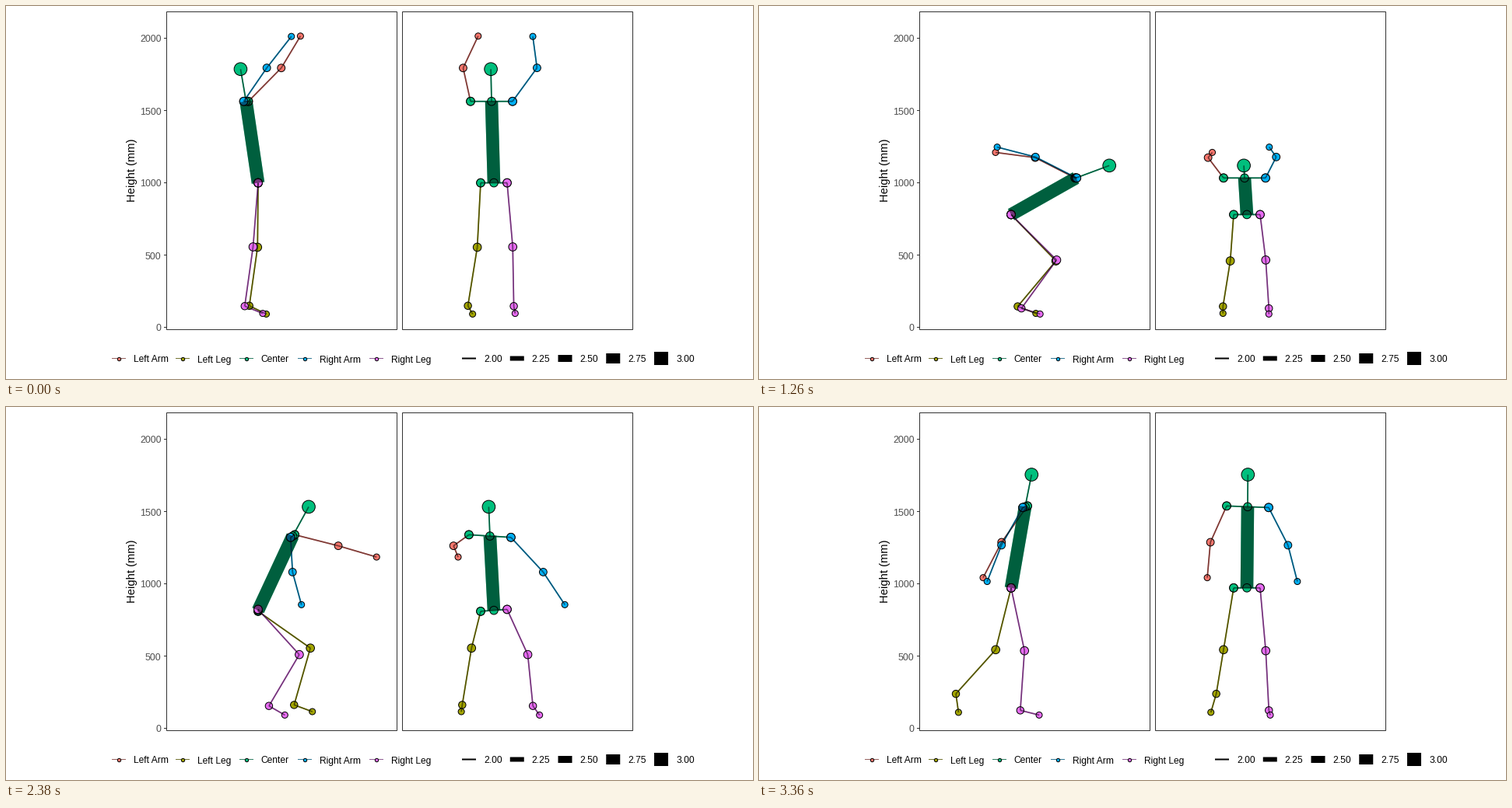
Animation, 960 px wide and 480 px high, one loop 3380 ms. Source, as a matplotlib script:

```python
import numpy as np
import matplotlib.pyplot as plt
from matplotlib.animation import FuncAnimation
from matplotlib.collections import LineCollection
from matplotlib.patches import Rectangle

W, H, DPI = 960, 480, 80
PX = 72 / DPI                      # points per pixel
STEP, COUNT = 20, 169
T = np.arange(COUNT) * float(STEP)

plt.rcParams["font.family"] = ["Liberation Sans", "DejaVu Sans"]

COLORS = {
    "Left Arm": "#F8766D",
    "Left Leg": "#A3A500",
    "Center": "#00BF7D",
    "Right Arm": "#00B0F6",
    "Right Leg": "#E76BF3",
}

# Bone lengths in pixels
THIGH, SHANK, FOOT, UPPER, FORE = 83, 77, 25, 61, 51.6
HIP, SHOULDER, TRUNK, NECK = 17, 27, 106, 42
GROUND = 396.4


def ease(start, end):
    u = np.clip((T - start) / (end - start), 0, 1)
    return u * u * (3 - 2 * u)


# Share of each pose over time; the shares always add up to one.
changes = [ease(520, 740), ease(760, 1260), ease(1280, 1600),
           ease(1600, 2080), ease(2080, 2600), ease(2740, 3360)]
reach, upright, crouch, launch, tuck, sit, stride = (
    a - b for a, b in zip([np.ones(COUNT)] + changes,
                          changes + [np.zeros(COUNT)]))


def vec(x, y, front):
    return np.stack(np.broadcast_arrays(x, y, front, T)[:3], axis=1)


def bone(length, swing, out, side):
    """Bone hanging down, swung forward and spread outward by degrees."""
    swing, out = np.radians(swing), np.radians(out)
    reach_len = length * np.cos(out)
    return vec(reach_len * np.sin(swing), reach_len * np.cos(swing),
               -side * length * np.sin(out))


def leg(s):
    """Thigh, shank and foot; s is 1 for the left side, -1 for the right."""
    thigh = (-2.5 * reach + 9 * upright + 44.5 * crouch - 2.7 * launch
             + 36.7 * tuck + 56 * sit - stride
             + s * (2 - 2.5 * crouch + 1.5 * (launch + tuck)
                    + 6 * sit - 15 * stride))
    shank = (-8 * (reach + upright) - 38 * crouch - 50 * launch
             + 13 * tuck - 46 * sit - 23 * stride
             + s * (3 * tuck - 2 * (crouch + launch) + 10 * sit - 19 * stride))
    foot = (66 + 5 * crouch - 42 * launch + 10 * tuck - 8 * sit - 24 * stride
            + s * (7 * launch - 2 - 3 * tuck + 13 * sit - 32 * stride))
    thigh_out = (4 + 4.5 * launch + 10 * tuck + 9 * sit + 3 * stride
                 + s * (2.5 * (launch + tuck) - 1 - 8.5 * sit + 3 * stride))
    shank_out = 5 + 5 * tuck - 3 * launch + s * (2 + 2 * reach + 3 * launch)
    foot_out = (-5 * (reach + upright) + 17 * launch + 7 * tuck + 14 * sit
                + 10 * stride
                + s * (6 * stride - 9 * reach - 3 * upright - 14 * sit))
    return [bone(THIGH, thigh, thigh_out, s), bone(SHANK, shank, shank_out, s),
            bone(FOOT, foot, foot_out, s)]


def arm(s):
    upper = (140.5 * reach + 87 * upright - 117 * crouch + 113 * launch
             + 84 * tuck + 11.5 * sit - 32.5 * stride
             + s * (4 * tuck - 5 * (reach + upright) + 56.5 * sit - 3 * stride))
    fore = (145.5 * reach + 98.5 * upright - 101 * crouch + 120.5 * launch
            + 85.5 * tuck + 18.7 * sit - 24.5 * stride
            + s * (3.5 * (reach + crouch + tuck) - 2.5 * (upright + launch)
                   + 45.3 * sit - 3 * stride))
    upper_out = (20 - 4 * crouch - 9 * launch + 25 * tuck + 2 * (sit + stride)
                 + s * (3 * crouch - 11 * reach - 16 * (upright + sit)
                        - 5.5 * tuck - 2 * (launch + stride)))
    fore_out = (30.5 * tuck - 14 * reach - 4.5 * upright - 8 * crouch
                - 18.5 * launch + 2 * sit + 9 * stride
                + s * (2 * crouch - 8 * (reach + upright)
                       - 4.5 * (tuck + stride) - 29 * sit))
    return [bone(UPPER, upper, upper_out, s), bone(FORE, fore, fore_out, s)]


joints = {}


def chain(start, names, vectors):
    for name, vector in zip(names, vectors):
        joints[name] = joints[start] + vector
        start = name


legs = {1: leg(1), -1: leg(-1)}
tilt = 2 * sit

# The lower foot carries the body, except during the ballistic jump.
drop = np.maximum(*(sum(legs[s])[:, 1] + s * tilt for s in (1, -1)))
flight = 173 + 0.001119 * (T - 1831.6) ** 2
joints["pelvis"] = vec(324, np.minimum(GROUND - drop, flight), 627)

backward = np.sin(np.pi * np.clip(T / 600, 0, 1)) ** 2
lean = (-8.4 * reach + 8.8 * upright + 60.5 * crouch + 19 * launch
        + 6 * tuck + 36.8 * sit + 9.8 * stride - 6 * backward)
bend = np.sin(np.radians(lean)) ** 2
sway = -3 * (reach + crouch) - 10 * tuck - 2 * sit + stride
trunk = bone(TRUNK - 18 * bend ** 2, 180 - lean, 0, 1) + vec(0, 0, sway)
neck = bone(NECK + 5 * bend, 180 - 1.15 * lean, 0, 1) + vec(0, 0, 0.3 * sway)
chain("pelvis", ["neck", "head"], [trunk, neck])

twist = 3 - 4 * (crouch + tuck) - 2.5 * launch + 2 * sit
roll = 2 * tuck - 1.5 * launch - 4 * sit - stride
for side, s in (("l", 1), ("r", -1)):
    joints[side + "hip"] = joints["pelvis"] + s * vec(0, tilt, -HIP)
    joints[side + "sho"] = joints["neck"] + s * vec(twist, roll, -SHOULDER)
    chain(side + "hip", [side + n for n in ("knee", "ankle", "toe")], legs[s])
    chain(side + "sho", [side + n for n in ("elbow", "wrist")], arm(s))

PATHS = [
    ("Left Arm", "lsho lelbow lwrist"),
    ("Left Leg", "lhip lknee lankle ltoe"),
    ("Center", "lhip pelvis rhip"),
    ("Center", "lsho neck rsho"),
    ("Center", "neck head"),
    ("Center", "pelvis neck"),
    ("Right Arm", "rsho relbow rwrist"),
    ("Right Leg", "rhip rknee rankle rtoe"),
]
DIAMETER = {"head": 16.6, "ankle": 9.4, "elbow": 9.8, "wrist": 8, "toe": 8}

bones, dots = [], []
for group, path in PATHS:
    names = path.split()
    bones += [(a, b, group) for a, b in zip(names, names[1:])]
    dots += [(n, group) for n in names if (n, group) not in dots]


def diameter(name):
    return DIAMETER.get(name, DIAMETER.get(name[1:], 10.6))


fig = plt.figure(figsize=(W / DPI, H / DPI), dpi=DPI, facecolor="white")
ax = fig.add_axes([0, 0, 1, 1])
ax.set_xlim(0, W)
ax.set_ylim(H, 0)
ax.axis("off")


def line(x0, x1, y, color, width):
    ax.plot([x0, x1], [y, y], color=color, lw=width * PX,
            solid_capstyle="butt", snap=False)


def label(x, y, text, size=12, color="black", **kw):
    ax.text(x, y, text, fontsize=size * PX, color=color, **kw)


def half(color):
    return tuple(int(color[i:i + 2], 16) / 510 for i in (1, 3, 5))


for left in (206.5, 509.5):
    ax.add_patch(Rectangle((left, 7.5), 296, 409, fill=False, ec="#333333",
                           lw=PX, snap=False, zorder=1))
for k in range(5):
    y = 413.5 - 93 * k
    line(203, 206, y, "#333333", 1)
    label(199.5, y + 0.5, str(500 * k), 12.4, "#4D4D4D",
          ha="right", va="center_baseline")
label(162, 211.5, "Height (mm)", 14.8, rotation=90, ha="center", va="center")

for (name, color), x in zip(COLORS.items(), (145, 227, 309, 384, 476)):
    line(x - 9, x + 9, 453.5, half(color), 0.8)
    ax.scatter([x], [453.5], s=(4.4 * PX) ** 2, c=color, ec="black",
               lw=PX, zorder=3)
    label(x + 18.7, 458.5, name, va="baseline")
for k, width in enumerate((2, 6, 9, 13, 17)):
    x = 586 + 61.75 * k
    line(x, x + 18, 453.5, "black", width)
    label(x + 28, 458.5, f"{2 + k / 4:.2f}", va="baseline")

widths = [(16.5 if (a, b) == ("pelvis", "neck") else 1.7) * PX
          for a, b, _ in bones]
views = []
for column in (0, 2):
    style = dict(linewidths=widths, capstyle="butt", snap=False)
    tint = LineCollection([], colors=[COLORS[g] for *_, g in bones],
                          zorder=3, **style)
    shade = LineCollection([], colors=[(0, 0, 0, 0.5)], zorder=5, **style)
    ax.add_collection(tint, autolim=False)
    ax.add_collection(shade, autolim=False)
    marks = ax.scatter(np.zeros(len(dots)), np.zeros(len(dots)),
                       s=[(diameter(n) * PX) ** 2 for n, _ in dots],
                       c=[COLORS[g] for _, g in dots],
                       ec="black", lw=PX, zorder=4)
    views.append((column, tint, shade, marks))


def update(n):
    changed = []
    for column, tint, shade, marks in views:
        at = {name: p[n, [column, 1]] for name, p in joints.items()}
        segments = [(at[a], at[b]) for a, b, _ in bones]
        tint.set_segments(segments)
        shade.set_segments(segments)
        marks.set_offsets([at[name] for name, _ in dots])
        changed += [tint, shade, marks]
    return changed


anim = FuncAnimation(fig, update, frames=COUNT, interval=STEP,
                     repeat=True, repeat_delay=0, blit=False)
plt.show()
```
